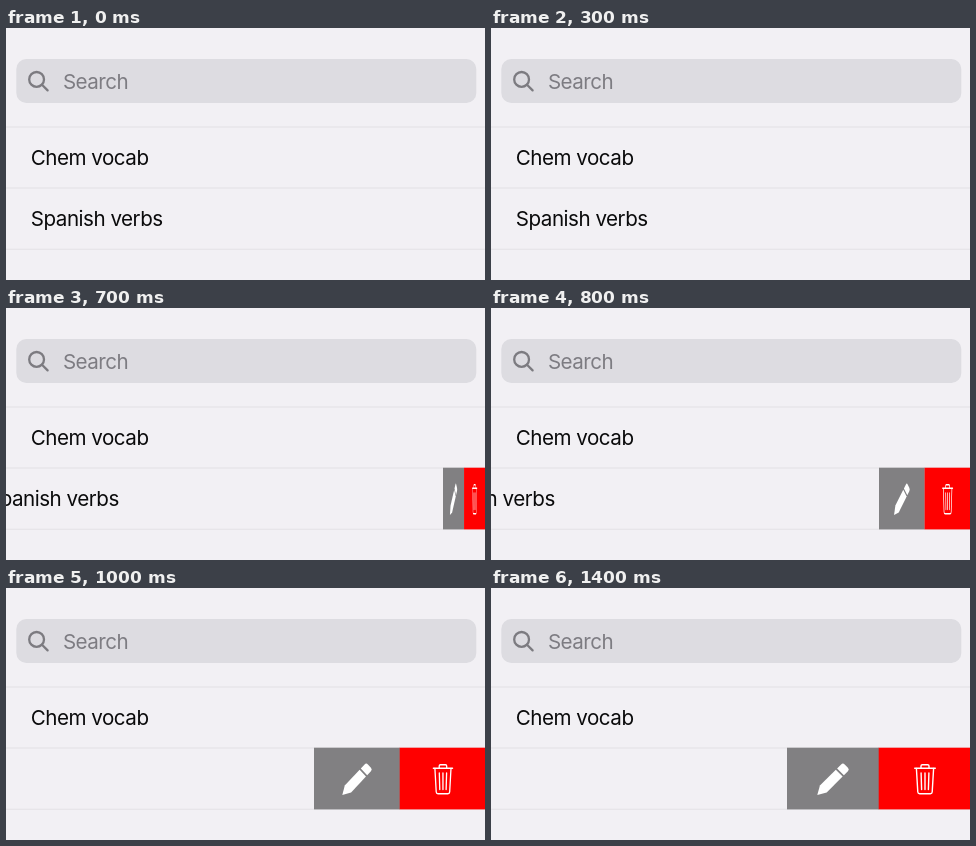
Animation of 479 by 252 pixels, one loop 2700 ms. Source, as an HTML page:

```html
<!DOCTYPE html>
<html lang="en">
<head>
<meta charset="utf-8">
<title>Swipe actions</title>
<style>
  html, body { margin: 0; width: 100%; height: 100%; overflow: hidden; background: #f2f0f4; }
  svg { display: block; width: 479px; height: 252px; }
  text { font: 400 20.6px Inter, Roboto, sans-serif; letter-spacing: -0.5px; fill: #0b0b0c; }
  .hint { fill: #7d7c82; }
  .lens { fill: none; stroke: #7c7b80; stroke-width: 2.3; stroke-linecap: round; }
  .rule { fill: #e3e2e5; }
  .bin { fill: none; stroke: #fff; stroke-width: 1.4; stroke-linejoin: round; stroke-linecap: round; }
</style>
</head>
<body>
<svg viewBox="0 0 479 252">
  <rect width="479" height="252" fill="#f2f0f4"/>

  <rect x="10.3" y="31" width="460" height="44" rx="10" fill="#dddce1"/>
  <g class="lens">
    <circle cx="30.6" cy="51.4" r="7.4"/>
    <path d="M36 56.8L41.6 62.4"/>
  </g>
  <text class="hint" x="56.9" y="60.8">Search</text>

  <rect class="rule" y="98.5" width="479" height="1"/>
  <text x="24.8" y="136.8">Chem vocab</text>
  <rect class="rule" y="159.5" width="479" height="1"/>
  <rect class="rule" y="220.7" width="479" height="1"/>

  <rect id="press" y="159.7" width="479" height="61.7" fill="#cfcdd0"/>
  <text id="label" x="24.8" y="197.8">Spanish verbs</text>

  <g id="actions">
    <rect y="159.7" width="92" height="61.7" fill="#818082"/>
    <rect x="91.7" y="159.7" width="91.3" height="61.7" fill="#f00"/>
    <g transform="translate(30.3 207) rotate(-45)" fill="#fff">
      <path d="M0 0L8.5 -4.8H31V4.8H8.5Z"/>
      <path d="M32.8 -4.8H38.5Q41 -4.8 41 -2.3V2.3Q41 4.8 38.5 4.8H32.8Z"/>
    </g>
    <g class="bin" transform="translate(138 0)">
      <path d="M-10.3 180.3H10.3M-4 180V178Q-4 176.7 -2.7 176.7H2.7Q4 176.7 4 178V180"/>
      <path d="M-8.6 180.5L-7.2 204Q-7.1 205.8 -5.3 205.8H5.3Q7.1 205.8 7.2 204L8.6 180.5"/>
      <path d="M-3.9 185L-3.4 201.5M0 185V201.5M3.9 185L3.4 201.5"/>
    </g>
  </g>
</svg>
<script>
  const LOOP = 2700, STAGE = 479, OPEN = 183;
  // [start ms, revealed width, row pressed]
  const steps = [
    [0, 0, false],
    [600, 0, true],
    [700, 42, false],
    [800, 91, false],
    [900, 136, false],
    [1000, 171, false],
    [1100, 180, false],
    [1200, 182, false],
    [1300, OPEN, false]
  ];
  const [press, label, actions] = ['press', 'label', 'actions'].map(id => document.getElementById(id));
  const show = (node, on) => node.setAttribute('visibility', on ? 'visible' : 'hidden');

  function draw(ms) {
    const [, width, pressed] = steps.findLast(([start]) => ms >= start);
    show(press, pressed);
    show(actions, width > 0);
    label.setAttribute('transform', `translate(${width ? -width - 1.8 : 0} 0)`);
    actions.setAttribute('transform', `translate(${STAGE - width} 0) scale(${width / OPEN} 1)`);
  }

  const begin = performance.now();
  function tick() {
    draw((performance.now() - begin) % LOOP);
    requestAnimationFrame(tick);
  }
  tick();
</script>
</body>
</html>
```
